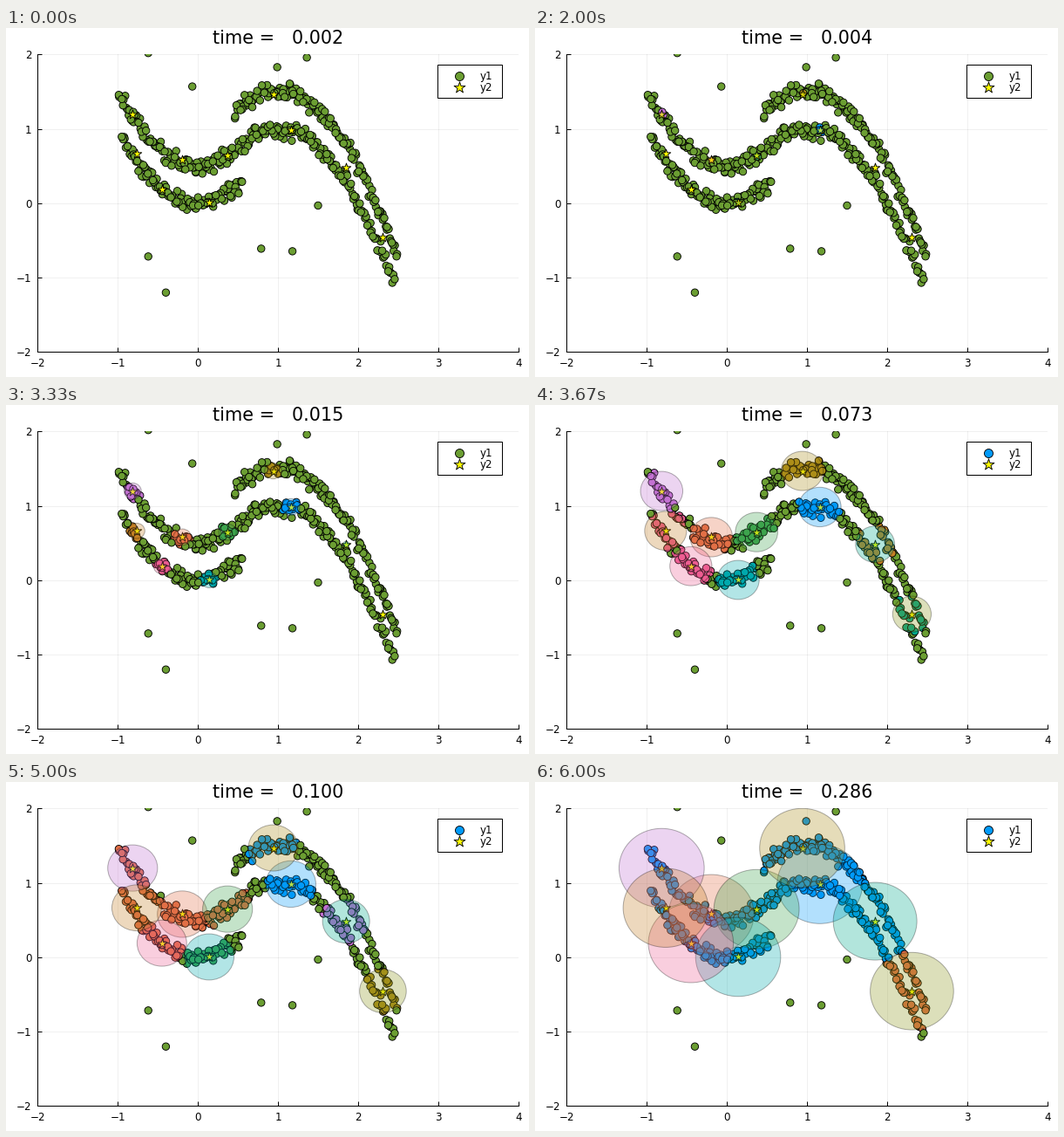
A matplotlib script for the animation above (8 s loop, 600 px wide and 400 px high).

```python
import numpy as np
import matplotlib.pyplot as plt
from matplotlib.animation import FuncAnimation
from matplotlib.patches import Circle, Rectangle

PX = 0.72  # points per pixel at 100 dpi
plt.rcParams["font.family"] = "DejaVu Sans"

PALETTE = np.array(["#009afa", "#e26f46", "#3da44d", "#c371d2", "#ac8d18",
                    "#00a9ad", "#ed5d92", "#c68125", "#00a98c", "#8e971d"])
UNBORN = "#6b9e32"
STEPS = 24

# radius parameter at each event; the last one is held
TIMES = np.r_[0.002, 0.003, np.linspace(0.0036, 0.0042, 5), 0.008, 0.014,
              0.015, 0.056, 0.073, 0.079, 0.084, 0.091, 0.100,
              0.190, 0.193, 0.286]

# one centre is born per event, then one pair of clusters merges per event
CENTRES = np.array([(1.16, 0.985), (-0.195, 0.58), (0.37, 0.648),
                    (-0.815, 1.2), (0.94, 1.47), (0.14, 0.005),
                    (-0.45, 0.19), (-0.765, 0.665), (1.85, 0.485),
                    (2.31, -0.455)])
COUNT = len(CENTRES)
OFFSETS = np.r_[np.linspace(0.0025, 0.0045, COUNT - 2), 0.0135, 0.015]
MERGES = [(6, 7), (1, 2), (0, 4), (1, 6), (1, 3), (0, 1), (0, 5), (0, 8)]

STRAYS = [(-.62, 2.02), (-.07, 1.57), (.99, 1.83), (1.36, 1.96), (1.5, -.03),
          (.79, -.61), (1.18, -.645), (-.62, -.715), (-.4, -1.2)]

rng = np.random.default_rng(7)


def strand(curve, start, end, density=72):
    """Points spread evenly in x along a curve, with noise in y."""
    count = int((end - start) * density)
    x = start + (end - start) * (np.arange(count) + rng.random(count)) / count
    noise = rng.normal(0, 0.06, count).clip(-0.13, 0.13)
    return np.column_stack([x, curve(x) + noise])


def valley(x):
    return x ** 2


def hill(x):
    return 1 - (x - 1) ** 2


cloud = np.vstack([strand(valley, -0.96, 0.56),
                   strand(lambda x: valley(x) + 0.5, -1, 0.5),
                   strand(hill, 0.5, 2.46),
                   strand(lambda x: hill(x) + 0.5, 0.45, 2.5)])
points = np.vstack([rng.permutation(cloud), STRAYS])
dist2 = ((points[:, None] - CENTRES) ** 2).sum(axis=2)

fig = plt.figure(figsize=(6, 4), dpi=100, facecolor="white")
ax = fig.add_axes([36.4 / 600, 28.6 / 400, 551.3 / 600, 341 / 400])
ax.set(xlim=(-2, 4), ylim=(-2, 2), xticks=range(-2, 5), yticks=range(-2, 3))
ax.spines[["top", "right"]].set_visible(False)
ax.spines[["left", "bottom"]].set_linewidth(PX)
ax.tick_params(direction="in", length=5 * PX, width=PX, pad=7 * PX,
               labelsize=11.9 * PX)
ax.grid(color="black", alpha=0.06, linewidth=PX)
ax.set_axisbelow(True)


def scatter(where, x, y, size, color, **style):
    return where.scatter(x, y, s=(size * PX) ** 2, c=color, linewidths=0.9 * PX,
                         edgecolors="black", **style)


dots = scatter(ax, *points.T, 8.4, UNBORN, zorder=3)
scatter(ax, *CENTRES.T, 11, "yellow", marker="*", zorder=4)
discs = [ax.add_patch(Circle(c, 0, facecolor=col, edgecolor="black",
                             alpha=0.3, linewidth=PX, zorder=5))
         for c, col in zip(CENTRES, PALETTE)]

# title and legend in pixel coordinates
page = fig.add_axes([0, 0, 1, 1])
page.set(xlim=(0, 600), ylim=(400, 0))
page.axis("off")
title = page.text(237.2, 18.5, "", fontsize=20.8 * PX)
page.add_patch(Rectangle((495.2, 42.2), 74, 38, facecolor="white",
                         edgecolor="black", linewidth=PX))
key = scatter(page, 519.7, 54.8, 10, UNBORN)
scatter(page, 519.7, 67.9, 13.5, "yellow", marker="*")
for y, name in ((59, "y1"), (72, "y2")):
    page.text(543.8, y, name, fontsize=11.9 * PX)


def cluster_labels(step):
    """Cluster number of each centre, renumbered after the merges so far."""
    root = np.arange(COUNT)
    for old, young in MERGES[:max(step - COUNT, 0)]:
        root[root == root[young]] = root[old]
    return np.unique(root, return_inverse=True)[1]


def draw(i):
    step = min(i, len(TIMES) - 1)
    t = TIMES[step]
    born = np.arange(COUNT) < step
    title.set_text(f"time =   {t:.3f}")

    radii = np.sqrt(np.maximum(t - OFFSETS, 0))
    for disc, r, on in zip(discs, radii, born):
        disc.set_radius(r)
        disc.set_visible(bool(on))

    power = np.where(born, dist2 + OFFSETS, np.inf)
    nearest = power.argmin(axis=1)
    reached = power.min(axis=1) <= 1.05 * t
    hues = PALETTE[cluster_labels(step)][nearest]
    dots.set_facecolor(list(np.where(reached, hues, UNBORN)))
    key.set_facecolor(PALETTE[0] if born.all() else UNBORN)
    return [title, dots, key, *discs]


anim = FuncAnimation(fig, draw, frames=STEPS, init_func=lambda: draw(0),
                     interval=8000 / STEPS, repeat=True, repeat_delay=0)
plt.show()
```
